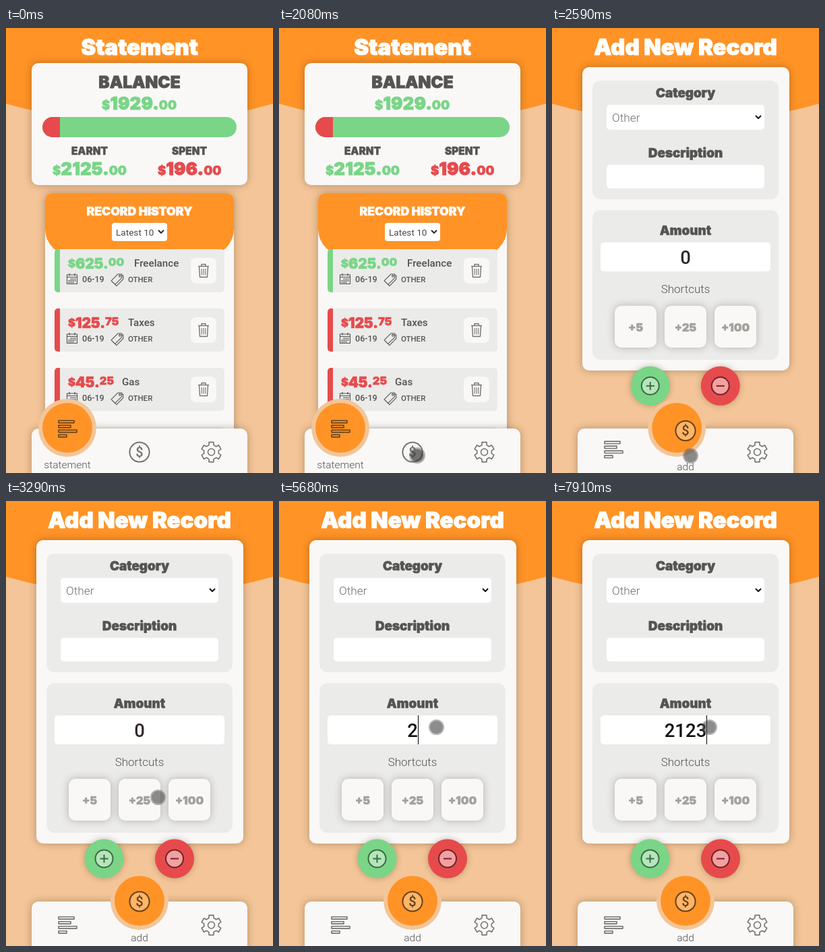
An HTML page with a canvas that plays this animation: 396 by 660 pixels, repeating every 8000 ms.

```html
<!DOCTYPE html>
<html lang="en">
<head>
<meta charset="utf-8">
<title>Budget app</title>
<style>
html, body { margin: 0; width: 100%; height: 100%; overflow: hidden; background: #f3c598; }
canvas { display: block; }
</style>
</head>
<body>
<canvas id="stage" width="396" height="660"></canvas>
<script>
const ctx = document.getElementById('stage').getContext('2d');
const LOOP = 8000;
const C = {
  peach: '#f3c598', orange: '#ff9326', card: '#f9f8f7', panel: '#ebebea', green: '#7ad587',
  red: '#e74a4c', dark: '#555453', icon: '#737373', brown: '#66401c', pale: '#ffb566'
};
const DISPLAY = 'Inter, Roboto, sans-serif';
const BODY = 'Roboto, "Open Sans", sans-serif';

// Steps: [start, x, y, pressed]
const pointerSteps = [
  [1030, 154.5, 631.5], [1200, 188.5, 631.5], [1380, 199.5, 634.5], [1560, 205.5, 634.5],
  [1890, 205, 634, 1], [2080, 205, 634, 1], [2430, 205.5, 634.5], [3100, 199.5, 630.5],
  [3290, 225.5, 439.5], [3460, 236.5, 393.5], [3620, 237.5, 354.5], [3790, 237.5, 348.5],
  [3970, 235.5, 340.5], [4320, 233.5, 339.5], [4490, 233.5, 335.5]
];
// Steps: [start, value, caret]
const typingSteps = [
  [0, '0', 0], [4490, '0', 1], [4980, '0', 0], [5330, '', 1],
  [5680, '2', 1], [6030, '21', 1], [6710, '212', 1], [7910, '2123', 1]
];
// Steps: [start, how far the tab switch has come]
const switchSteps = [[2430, 0.51], [2590, 0.88], [2760, 1]];

const stepAt = (steps, t) => steps.filter(s => s[0] <= t).pop();
const mix = (a, b, k) => a + (b - a) * k;

function shadow(blur, alpha, dy = 0) {
  ctx.shadowColor = `rgba(60,40,20,${alpha})`;
  ctx.shadowBlur = blur;
  ctx.shadowOffsetY = dy;
}

function box(x, y, w, h, r, fill, blur = 0, alpha = 0.35) {
  ctx.save();
  if (blur) shadow(blur, alpha);
  ctx.fillStyle = fill;
  ctx.beginPath();
  ctx.roundRect(x, y, w, h, r);
  ctx.fill();
  ctx.restore();
}

function disc(x, y, r, fill, stroke, width = 2) {
  ctx.beginPath();
  ctx.arc(x, y, r, 0, Math.PI * 2);
  if (fill) { ctx.fillStyle = fill; ctx.fill(); }
  if (stroke) { ctx.strokeStyle = stroke; ctx.lineWidth = width; ctx.stroke(); }
}

function line(color, width, ...points) {
  ctx.strokeStyle = color;
  ctx.lineWidth = width;
  ctx.beginPath();
  points.forEach(([x, y]) => ctx.lineTo(x, y));
  ctx.stroke();
}

function label(text, x, y, size, color, weight = 400, align = 'left') {
  ctx.font = `${weight} ${size}px ${BODY}`;
  ctx.textAlign = align;
  ctx.fillStyle = color;
  ctx.fillText(text, x, y);
}

function heading(text, x, y, size, color, align = 'center') {
  ctx.font = `900 ${size}px ${DISPLAY}`;
  ctx.textAlign = align;
  ctx.fillStyle = ctx.strokeStyle = color;
  ctx.lineWidth = size / 30;
  ctx.fillText(text, x, y);
  ctx.strokeText(text, x, y);
  return ctx.measureText(text).width;
}

function money(whole, cents, x, y, big, small, color, raise = 0) {
  x += heading('$', x, y - raise / 2, small, color, 'left');
  x += heading(whole + '.', x, y, big, color, 'left');
  heading(cents, x, y - raise, small, color, 'left');
}

function chevron(x, y, color) {
  line(color, 2, [x - 4, y - 2], [x, y + 2], [x + 4, y - 2]);
}

function calendarIcon(x, y) {
  ctx.strokeStyle = C.dark;
  ctx.lineWidth = 1.1;
  ctx.strokeRect(x - 7.5, y - 6, 15, 13.5);
  line(C.dark, 1, [x - 7.5, y - 2.5], [x + 7.5, y - 2.5]);
  for (const dx of [-4, 4]) line(C.dark, 1.3, [x + dx, y - 8], [x + dx, y - 4.5]);
  ctx.fillStyle = C.dark;
  for (let i = 0; i < 12; i++) {
    if (i !== 0 && i !== 11) ctx.fillRect(x - 5.5 + (i % 4) * 3, y - 0.5 + Math.floor(i / 4) * 2.6, 2, 1.6);
  }
}

function tagIcon(x, y) {
  ctx.save();
  ctx.translate(x, y);
  ctx.rotate(-Math.PI / 4);
  for (const dy of [2, -1]) {
    ctx.beginPath();
    ctx.moveTo(-9, dy - 4);
    ctx.lineTo(5, dy - 4);
    ctx.lineTo(9, dy);
    ctx.lineTo(5, dy + 4);
    ctx.lineTo(-9, dy + 4);
    ctx.closePath();
    ctx.fillStyle = C.panel;
    ctx.fill();
    ctx.strokeStyle = C.dark;
    ctx.lineWidth = 1.1;
    ctx.stroke();
  }
  disc(5, -1, 1.3, null, C.dark, 1);
  ctx.restore();
}

function trashIcon(x, y) {
  line(C.icon, 1.4, [x - 8, y - 6.5], [x + 8, y - 6.5]);
  line(C.icon, 1.4, [x - 3, y - 6.5], [x - 3, y - 9.5], [x + 3, y - 9.5], [x + 3, y - 6.5]);
  line(C.icon, 1.4, [x - 6.5, y - 6], [x - 5.5, y + 9.5], [x + 5.5, y + 9.5], [x + 6.5, y - 6]);
  for (const dx of [-2.8, 0, 2.8]) line(C.icon, 1.1, [x + dx, y - 3], [x + dx, y + 6.5]);
}

function linesIcon(x, y, color) {
  ctx.strokeStyle = color;
  ctx.lineWidth = 1.6;
  [23, 18, 27, 12].forEach((w, i) => ctx.strokeRect(x - 13, y - 11.8 + i * 7, w, 3.4));
}

function dollarIcon(x, y, color, fill) {
  disc(x, y, 14.6, fill, color, 2);
  label('$', x, y + 7, 20, color, 500, 'center');
}

function gearIcon(x, y) {
  ctx.beginPath();
  for (let i = 0; i < 6; i++) {
    const a = i * Math.PI / 3 - Math.PI / 2;
    for (const [da, r] of [[-0.33, 11], [-0.23, 15], [0.23, 15], [0.33, 11]]) {
      ctx.lineTo(x + r * Math.cos(a + da), y + r * Math.sin(a + da));
    }
  }
  ctx.closePath();
  ctx.strokeStyle = C.icon;
  ctx.lineWidth = 1.6;
  ctx.stroke();
  disc(x, y, 5, null, C.icon, 1.6);
}

function backdrop(title) {
  ctx.fillStyle = C.peach;
  ctx.fillRect(0, 0, 396, 660);
  disc(198, -578, 718, C.orange);
  heading(title, 198, 40, 33, '#fff');
}

function record(y, color, whole, cents, name, nameX) {
  box(72, y, 252, 64, 5, C.panel);
  box(72, y, 8, 64, [5, 0, 0, 5], color);
  money(whole, cents, 92, y + 29, 21, 16.5, color, 4);
  label(name, nameX, y + 26, 15.2, C.dark, 500);
  calendarIcon(98, y + 44);
  label('06-19', 113, y + 49, 12.6, C.dark, 500);
  tagIcon(166, y + 44);
  label('OTHER', 181, y + 49, 11.5, C.dark, 500);
  box(274, y + 13, 38, 38, 8, C.card);
  trashIcon(293, y + 32);
}

function statementPage() {
  backdrop('Statement');
  box(38, 52, 320, 181, 10, C.card, 12);
  heading('BALANCE', 198, 89, 24.5, C.dark);
  money('1929', '00', 142, 121, 26, 18.5, C.green);
  box(54, 132, 288, 30, 15, C.green);
  box(54, 132, 26, 30, [15, 0, 0, 15], C.red);
  heading('EARNT', 124, 188, 15.3, C.dark);
  heading('SPENT', 272, 188, 15.3, C.dark);
  money('2125', '00', 69, 218, 26, 18.5, C.green);
  money('196', '00', 225, 218, 26, 18.5, C.red);

  box(58, 245, 280, 430, 10, C.card, 12);
  box(58, 245, 280, 93, [10, 10, 40, 40], C.orange);
  heading('RECORD HISTORY', 198, 278, 17.6, '#fff');
  box(157, 289, 82, 27, 4, '#fff');
  label('Latest 10', 163, 308, 13.6, '#4b4b4b');
  chevron(230, 302, '#3a2a20');
  record(328, C.green, '625', '00', 'Freelance', 190);
  record(416, C.red, '125', '75', 'Taxes', 181);
  record(504, C.red, '45', '25', 'Gas', 172);
  box(72, 592, 252, 64, 5, C.panel);
}

function amountField(t) {
  const [, value, caret] = stepAt(typingSteps, t);
  box(72, 318, 252, 43, 5, '#fff');
  label(value, 198, 350, 27.5, value === '0' ? '#33282a' : '#111', 500, 'center');
  if (caret) {
    const x = Math.round(197.7 + ctx.measureText(value).width / 2);
    ctx.fillStyle = '#000';
    ctx.fillRect(x, 318, 1, 43);
  }
}

function signButton(x, y, fill, inner, color, plus) {
  ctx.save();
  shadow(10, 0.3);
  disc(x, y, 29, fill);
  ctx.restore();
  disc(x, y, 13, inner, color, 2);
  line(color, 2, [x - 6, y], [x + 6, y]);
  if (plus) line(color, 2, [x, y - 6], [x, y + 6]);
}

function addPage(t, k) {
  backdrop('Add New Record');
  box(45, 58, 307, 450, 10, C.card, 12);
  box(60, 78, 276, 176, 12, C.panel);
  heading('Category', 198, 103, 18.8, C.dark);
  box(81, 114, 234, 37, 5, '#fff');
  label('Other', 89, 139, 17.3, '#6d6d6d', 300);
  chevron(306, 132, '#111');
  heading('Description', 198, 192, 18.8, C.dark);
  box(81, 203, 234, 35, 5, '#fff');

  box(60, 270, 276, 222, 12, C.panel);
  heading('Amount', 198, 307, 18.8, C.dark);
  amountField(t);
  label('Shortcuts', 198, 393, 17, C.dark, 300, 'center');
  ['+5', '+25', '+100'].forEach((text, i) => {
    box(93 + i * 74, 412, 62, 62, 10, C.card, 12, 0.3);
    heading(text, 124 + i * 74, 450, 16.4, '#a5a09c');
  });

  const drop = 1.5 * (1 - k) * 2;
  signButton(145.5 + drop * 0.7, 530.5 + drop, C.green, '#b4e6ba', '#3d6b43', true);
  signButton(250 - drop * 0.7, 530.5 + drop, C.red, '#f3a0a0', '#6f2426', false);
}

// k runs from the statement tab (0) to the add tab (1)
function navBar(k) {
  box(38, 594, 320, 80, 10, C.card, 12);
  const x = mix(91, 198, k);
  disc(x, 593, 43, C.peach);
  disc(x, 593, 37, C.orange);
  const arrived = k > 0.8;
  linesIcon(91, k ? mix(599, 628.5, k) : 594, k ? C.icon : C.brown);
  dollarIcon(198, k ? mix(622, 594, k) : 629, arrived ? C.brown : C.icon, arrived ? C.pale : null);
  gearIcon(304.5, 629);
  if (k) label('add', 198, mix(664, 653, (k - 0.51) / 0.49), 15.5, C.dark, 300, 'center');
  else label('statement', 91, 653, 15.5, C.dark, 300, 'center');
}

function pointer(t) {
  const step = stepAt(pointerSteps, t);
  if (!step) return;
  const [, x, y, pressed] = step;
  disc(x, y, pressed ? 12 : 11.5, 'rgba(90,90,90,.45)');
  disc(x, y, 9.5, pressed ? 'rgba(50,50,50,.5)' : 'rgba(70,70,70,.36)');
}

function draw(t) {
  const moved = stepAt(switchSteps, t);
  const k = moved ? moved[1] : 0;
  if (k) addPage(t, k);
  else statementPage();
  navBar(k);
  pointer(t);
}

ctx.lineJoin = 'round';
const start = performance.now();
function tick() {
  draw((performance.now() - start) % LOOP);
  requestAnimationFrame(tick);
}
tick();
</script>
</body>
</html>
```
